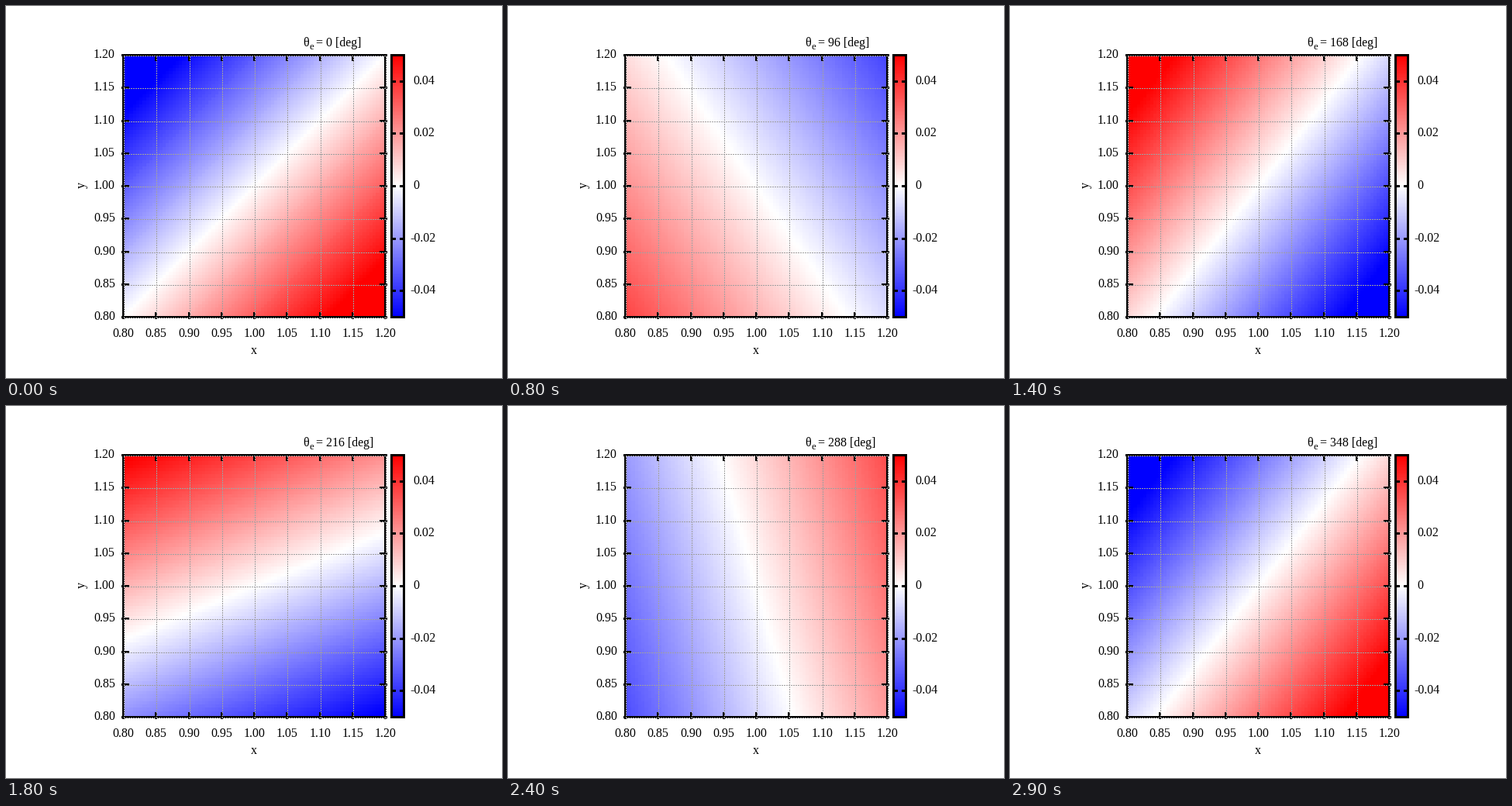
Write a matplotlib script that moves like this. It is 640 px wide and 480 px high and loops after 3000 ms.

```python
import numpy as np
import matplotlib.pyplot as plt
from matplotlib.animation import FuncAnimation
from matplotlib.colors import LinearSegmentedColormap
from matplotlib.patches import Rectangle

W, H, DPI = 640, 480, 100
PX = 72 / DPI                                  # one pixel in points
LEFT, RIGHT, TOP, BOTTOM = 151, 489, 63, 401   # plot border centres
BAR_L, BAR_R = 497, 513                        # colour bar border centres
LO, HI, CELLS = 0.8, 1.2, 80
LIMIT, GAIN = 0.05, 0.185
FRAMES, STEP = 30, 12

plt.rcParams["font.family"] = "Liberation Serif"
plt.rcParams["axes.unicode_minus"] = False

fig = plt.figure(figsize=(W / DPI, H / DPI), dpi=DPI, facecolor="white")
ax = fig.add_axes([0, 0, 1, 1])
ax.set_xlim(0, W)
ax.set_ylim(H, 0)
ax.axis("off")

cmap = LinearSegmentedColormap.from_list(
    "bwr", [(0, 0, 1), (1, 1, 1), (1, 0, 0)], N=256)


def block(x0, y0, x1, y1):
    """Black rectangle covering pixels x0..x1, y0..y1 inclusive."""
    ax.add_patch(Rectangle((x0, y0), x1 - x0 + 1, y1 - y0 + 1, fc="black",
                           ec="none", antialiased=False, zorder=3))


def border(x0, y0, x1, y1):
    block(x0 - 1, y0 - 1, x1 + 1, y0 + 1)
    block(x0 - 1, y1 - 1, x1 + 1, y1 + 1)
    block(x0 - 1, y0 - 1, x0 + 1, y1 + 1)
    block(x1 - 1, y0 - 1, x1 + 1, y1 + 1)


def dotted(xs, ys):
    ax.plot(np.add(xs, 0.5), np.add(ys, 0.5), color="#a0a0a0", lw=PX,
            ls=(0, (2, 2)), dash_capstyle="butt", antialiased=False, zorder=4)


def label(x, y, s, size=16, **kw):
    kw.setdefault("va", "baseline")
    return ax.text(x, y, s, fontsize=size * PX, color="black", zorder=5, **kw)


def heat(data, x0, y0, x1, y1):
    image = ax.imshow(data, extent=(x0, x1, y1, y0), cmap=cmap, vmin=-LIMIT,
                      vmax=LIMIT, interpolation="nearest", aspect="auto",
                      origin="upper", zorder=1)
    ax.set_xlim(0, W)
    ax.set_ylim(H, 0)
    return image


mid = LO + (np.arange(CELLS) + 0.5) * (HI - LO) / CELLS
gx, gy = np.meshgrid(mid, mid[::-1])


def field(deg):
    a = np.radians(deg)
    tilt = np.pi / 6
    return GAIN * ((gx - 1) * np.cos(a + tilt) - (gy - 1) * np.cos(a - tilt))


# Heat map with border, ticks and grid
surface = heat(field(0), LEFT, TOP, RIGHT + 1, BOTTOM + 1)
border(LEFT, TOP, RIGHT, BOTTOM)
for k in range(9):
    x = int(LEFT + (RIGHT - LEFT) * k / 8 + 0.5)
    y = int(BOTTOM - (BOTTOM - TOP) * k / 8 + 0.5)
    block(x - 1, TOP - 1, x + 1, TOP + 7)
    block(x - 1, BOTTOM - 6, x + 1, BOTTOM + 2)
    block(LEFT - 2, y - 1, LEFT + 7, y + 1)
    block(RIGHT - 7, y - 1, RIGHT + 2, y + 1)
    dotted([x, x], [BOTTOM, TOP])
    dotted([LEFT, RIGHT], [y, y])
    name = f"{LO + 0.05 * k:.2f}"
    label(x + 0.5, 427, name, ha="center")
    label(141, y + 4, name, ha="right")

label(320, 449, "x", ha="center")
label(97.5, 231, "y", ha="center", va="center", rotation=90)

# Colour bar
heat(np.linspace(LIMIT, -LIMIT, 256)[:, None], BAR_L, TOP, BAR_R + 1, BOTTOM + 1)
border(BAR_L, TOP, BAR_R, BOTTOM)
for v in (0.04, 0.02, 0, -0.02, -0.04):
    y = int((TOP + BOTTOM) / 2 - v * (BOTTOM - TOP) / (2 * LIMIT) + 0.5)
    block(BAR_L - 1, y - 1, BAR_L + 5, y + 1)
    block(BAR_R - 5, y - 1, BAR_R + 1, y + 1)
    label(521 if v < 0 else 525, y + 4, f"{v:g}", ha="left")

# Title
label(383, 52, "θ")
label(391, 55.5, "e", size=12.8)
title = label(400, 52, "")


def draw(i):
    deg = STEP * i
    surface.set_data(field(deg))
    title.set_text(f"= {deg} [deg]")
    return surface, title


anim = FuncAnimation(fig, draw, frames=FRAMES, interval=100, repeat=True,
                     repeat_delay=0, blit=False)
plt.show()
```
